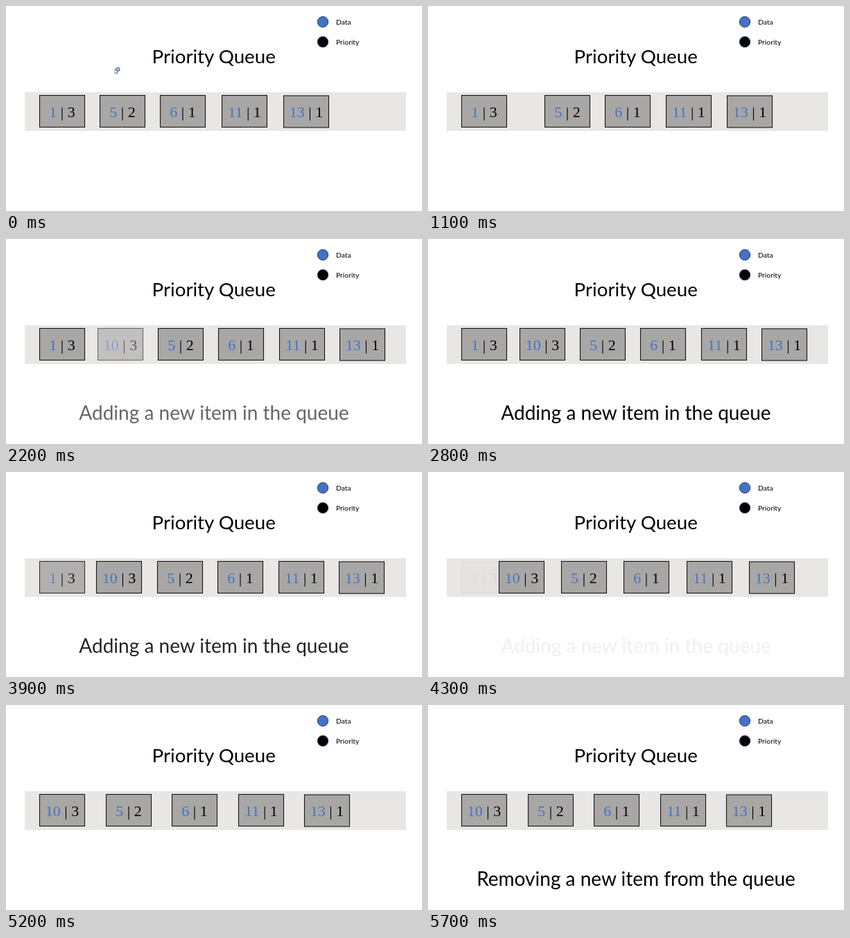
Write an HTML page that moves like this. It is 600x297 px and loops after 6000 ms.

```html
<!DOCTYPE html>
<html lang="en">
<head>
<meta charset="utf-8">
<title>Priority Queue</title>
<style>
  html, body { margin: 0; width: 100%; height: 100%; overflow: hidden; background: #fff; }
  svg { display: block; width: 600px; height: 297px; }
  text { font-family: Lato, sans-serif; fill: #000; }
  .heading { font-size: 28px; text-anchor: middle; }
  .title { font-size: 27.7px; text-anchor: middle; }
  .legend { font-size: 10.3px; }
  .item rect { fill: #a8a7a6; stroke: #151515; stroke-width: 1.1; }
  .item text { font: 22px "Liberation Serif", serif; text-anchor: middle; }
  .item .data { fill: #4472c4; }
</style>
</head>
<body>
<svg viewBox="0 0 600 297">
  <g stroke="#263f70">
    <circle cx="457" cy="23" r="7.7" fill="#4472c4"/>
    <circle cx="457" cy="52" r="7.7" fill="#000"/>
  </g>
  <text class="legend" x="476" y="27">Data</text>
  <text class="legend" x="476" y="55.5">Priority</text>
  <text class="title" x="299.7" y="83">Priority Queue</text>
  <rect x="27" y="125" width="550" height="56" fill="#e8e7e5"/>
  <g id="items"></g>
  <text class="heading" id="adding" x="300" y="262">Adding a new item in the queue</text>
  <text class="heading" id="removing" x="300" y="262">Removing a new item from the queue</text>
  <g id="cursor">
    <path d="M157 91v7l1.6-1.4 1.2 2 1-.6-1-1.9h2z" fill="#fff" stroke="#555" stroke-width=".7"/>
    <circle cx="161.5" cy="91.8" r="2.2" fill="#dbe9fb" stroke="#4472c4" stroke-width="1.5"/>
  </g>
</svg>
<script>
const LOOP = 6000, STEP = 100;

// x: before the insertion, after it, after the removal
const ITEMS = [
  { data: 1,  priority: 3, y: 129.5, x: [48, 48, 48] },
  { data: 10, priority: 3, y: 129.5, x: [132, 132, 48] },
  { data: 5,  priority: 2, y: 129.5, x: [135, 219, 143.6] },
  { data: 6,  priority: 1, y: 129.5, x: [222, 306, 239.4] },
  { data: 11, priority: 1, y: 129.5, x: [311, 394, 334.6] },
  { data: 13, priority: 1, y: 130, x: [400, 481, 430] }
];

const byId = id => document.getElementById(id);
const clamp = v => Math.min(1, Math.max(0, v));
const progress = (t, from, to) => clamp((t - from) / (to - from));

// Speeds up over the share a, runs evenly, slows down over the share a.
function glide(u, a) {
  const scale = 2 * a * (1 - a);
  if (u < a) return u * u / scale;
  if (u > 1 - a) return 1 - (1 - u) ** 2 / scale;
  return (u - a / 2) / (1 - a);
}

const nodes = ITEMS.map(({ data, priority }) => {
  const node = document.createElementNS("http://www.w3.org/2000/svg", "g");
  node.setAttribute("class", "item");
  node.innerHTML = `<rect width="65" height="46"/>
    <text x="32.5" y="31"><tspan class="data">${data}</tspan> | ${priority}</text>`;
  byId("items").append(node);
  return node;
});

function draw(t) {
  const insert = glide(progress(t, 500, 2000), 0.11);
  const remove = glide(progress(t, 3790, 5090), 0.25);
  const appear = progress(t, 1900, 2400);
  const vanish = 1 - progress(t, 3830, 4330);

  ITEMS.forEach(({ x: [start, mid, end], y }, i) => {
    const x = start + (mid - start) * insert + (end - mid) * remove;
    // Half pixels keep the one-pixel border crisp.
    nodes[i].setAttribute("transform", `translate(${Math.round(x) + 0.5} ${y})`);
  });
  nodes[0].style.opacity = vanish;
  nodes[1].style.opacity = appear;
  byId("adding").style.opacity = appear * vanish;
  byId("removing").style.opacity = progress(t, 5200, 5700);
  byId("cursor").style.opacity = t < 300 ? 1 : 0;
}

const origin = performance.now();
function tick(now) {
  const t = Math.max(0, now - origin) % LOOP;
  draw(Math.floor(t / STEP) * STEP);
  requestAnimationFrame(tick);
}
draw(0);
requestAnimationFrame(tick);
</script>
</body>
</html>
```
